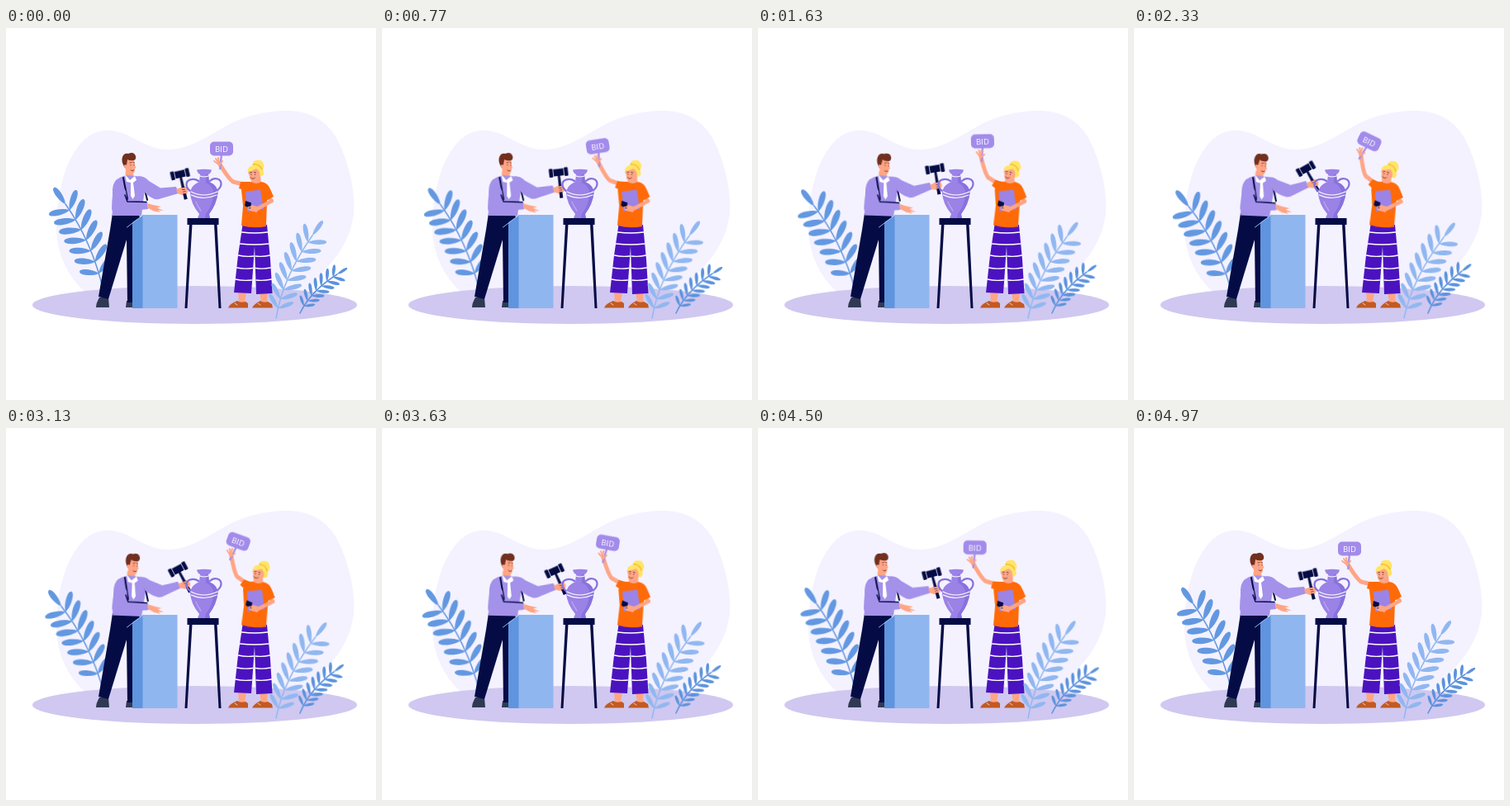
An HTML page for the animation above (5.01 s loop, 448 px wide and 450 px high).

```html
<!DOCTYPE html>
<html lang="en">
<head>
<meta charset="utf-8">
<title>Auction</title>
<style>
  html, body { margin: 0; width: 100%; height: 100%; overflow: hidden; background: #fff; }
  svg { display: block; width: 448px; height: 450px; }
  .sway, .gavel, .paddle {
    transform-origin: var(--o);
    animation: sway 5010ms cubic-bezier(.37, 0, .63, 1) infinite;
  }
  .gavel { animation-name: gavel; }
  .paddle { animation-name: paddle; }
  @keyframes sway {
    0%, 100% { transform: rotate(0deg); }
    51% { transform: rotate(var(--a)); }
  }
  @keyframes gavel {
    0%, 100% { transform: rotate(0deg); }
    27% { transform: rotate(14deg); }
    49% { transform: rotate(-7deg); }
    64% { transform: rotate(-6deg); }
  }
  @keyframes paddle {
    0%, 100% { transform: rotate(0deg); }
    27% { transform: rotate(-23deg); }
    49% { transform: rotate(2deg); }
    75% { transform: rotate(-5deg); }
  }
  .line { fill: none; stroke-linecap: round; stroke-linejoin: round; }
  .skin { fill: #ffa585; }
  .skin.line { fill: none; stroke: #ffa585; }
  .navy { fill: #050c45; }
  .navy.line { fill: none; stroke: #050c45; }
  .lilac { fill: #a491ea; }
  .orange { fill: #ff6a08; }
  .hair { fill: #ffe566; }
  .white.line { stroke: #fff; }
  .ink.line { stroke: #5b2a2a; stroke-width: .8; }
  text { font: 9.6px "Open Sans", "Noto Sans", sans-serif; fill: #fff; text-anchor: middle; }
</style>
</head>
<body>
<svg viewBox="0 0 448 450">
  <path fill="#f4f2ff" d="M94 318C70 295 60 265 61 236C62 195 73 160 90 140C108 120 128 121 148 130C165 138 178 148 200 147C235 144 255 120 290 108C310 102 325 100 342 100C375 101 395 118 406 145C417 172 423 200 421 225C417 255 402 276 385 294L360 325H100Z"/>
  <ellipse cx="228.500" cy="335" rx="196.500" ry="23" fill="#d0c8f0"/>

  <g id="fern" class="sway" style="--o:118px 318px; --a:-3.3deg"></g>

  <g id="man">
    <path fill="#2f3a52" d="M113 326H124L125 338H109Q109 333 113 326ZM146 330H156V338H145Z"/>
    <path class="navy" d="M129 224L161 223L164 245L157 332H147L146 256L124 328L112 325L126 244Z"/>
    <g class="sway" style="--o:141px 230px; --a:2.600deg">
      <path class="skin" d="M145 172L153 173L156 184L150 187L144 181Z"/>
      <g class="sway" style="--o:149px 179px; --a:6deg">
        <path class="skin" d="M143 160Q146 156 155 158L156 166L157.500 169L156 170Q156 177 152 177Q145 176 143 166Z"/>
        <path fill="#71301f" d="M144 169Q139 162 141 156Q143 151 148 152Q155 149 157 155Q158 159 155 160Q150 161 147 159L146 166Z"/>
        <circle class="skin" cx="144.600" cy="167" r="1.700"/>
        <path class="line ink" d="M150 163L152 162.500M154 162.500L155.500 163M151 165.500V166M155 165.500V166M151 172Q153 174 155 172"/>
      </g>
      <path class="lilac" d="M133 184Q138 180 146 178L157 179Q166 180 169 186L164 227H129Q127 204 133 184Z"/>
      <path fill="#fff" d="M144 177L150 184L156 179L158 184L154 187L156 203L153.500 207L151 203L151 187L146 186Z"/>
      <path class="line navy" stroke-width="2" d="M142 181L147 207M165 183L171 208"/>
      <g class="sway" style="--o:162px 187px; --a:-13deg">
        <path class="lilac" d="M160 179Q168 179 173 185L187 193.500L206 192L209 200L185 207Q177 209 165 196Z"/>
        <path class="skin" d="M206 195L212 193Q217 190 219.500 194L220.500 198Q218 202 213 202L207.500 200Z"/>
        <g class="gavel" style="--o:215px 197px">
          <g class="navy" transform="translate(1.500 .5) rotate(-13 214 197)">
            <path d="M212.600 178H215.400L216 207H212Z"/>
            <rect x="206.500" y="171.500" width="15" height="8.500"/>
            <rect x="202.500" y="170.500" width="4.500" height="10.500" rx="1"/>
            <rect x="221" y="170.500" width="4.500" height="10.500" rx="1"/>
            <path fill="#fff" d="M207 171.500H207.700V180H207ZM220.300 171.500H221V180H220.300Z"/>
          </g>
        </g>
        <path class="line skin" stroke-width="2.200" d="M212.500 194.500L218.500 193.500M213.500 197L219.500 196M213.500 199.500L218.500 199"/>
      </g>
      <path class="lilac" d="M135 183Q128 187 129 202L128 219Q130 224 137 223L172 219L171 211L147 211L145 197Z"/>
      <path class="line navy" stroke-width="1.500" d="M144 202L147 210L170 210.500"/>
      <path class="skin" d="M171 212L178 214L188 216L183 217.500L191 221L184 220.500L187 223L179 221.500L172 218Z"/>
    </g>
  </g>

  <g id="lectern">
    <path fill="#5f94de" d="M153 235L166 226V339H153Z"/>
    <path fill="#90b6ef" d="M165.500 226H207.500V339H165.500Z"/>
    <path class="line" stroke="#90b6ef" d="M146.500 241L166 226.500"/>
  </g>

  <g id="stool" class="navy">
    <path d="M219.500 230H257.500V238H219.500Z"/>
    <path d="M222 237H225.500L219.500 339H216.500ZM252 237H255.500L260.500 339H257.500Z"/>
  </g>

  <g id="vase">
    <path class="line" stroke="#8770dc" stroke-width="2.300" d="M233 185C227 181 218 183 218.500 190C219 196 225 198 226 200M247 185C252 180 261 182 260.500 189C260 195 254 197 253 200"/>
    <path fill="#9b82e6" d="M231 171.500Q240 170 249 171.500Q248 176 245 177L246 186Q257 191 256.500 200Q255 213 246 225L247 230H232L234 225Q224 213 223 200Q223 191 234 186L235 177Q232 176 231 171.500Z"/>
    <path fill="#8169db" d="M242 177H245L246 186Q257 191 256.500 200Q255 213 246 225L247 230H241L242 225Q251 213 251 200Q251 191 242 187Z" opacity=".7"/>
    <path class="line white" stroke-width="1.200" d="M235 179Q240 181 245 179M224 198Q239 206 256 198M224.500 202Q239 209 255 202"/>
    <path class="line" stroke="#b9a5ef" stroke-width="1.300" d="M230 210Q232 216 236 221"/>
  </g>

  <g id="woman">
    <path class="skin" d="M281 318H291L289 333H282ZM307 318H317L316 333H309Z"/>
    <path fill="#c25a22" d="M280 330Q284 333 290 331L293 333V338.500H269Q270 334 280 330ZM308 330Q312 333 317 331L322 334L323 338.500H298Q300 334 308 330Z"/>
    <path class="line" stroke="#fff" stroke-width=".7" d="M277 333L280 335M305 333L308 335"/>
    <path fill="#4b13bf" d="M286.500 238H316L320 280L322.500 321L303 322L301 264L297 321L276 320L281 275Z"/>
    <path class="line white" stroke-width="1.300" d="M285.500 247Q301 249 316.500 247M283.500 261Q301 263 318 261M281.500 275Q290 277 300 276M302 276Q311 277 319.500 275M279.500 290Q288 292 298.500 290.500M302.500 290.500Q311 292 320.500 290M278 304Q286 306 297.500 305M303 305Q311 306 321.500 304"/>
    <g class="sway" style="--o:303px 240px; --a:3deg">
      <g class="sway" style="--o:291px 190px; --a:22deg">
        <path class="line skin" stroke-width="5" d="M291 190L275 186Q270 183 259 165"/>
        <g class="paddle" style="--o:259px 164px">
          <path class="line" stroke="#a58fea" stroke-width="2.400" d="M261 152L259.300 170"/>
          <rect fill="#a28bea" x="247" y="137.500" width="28" height="17" rx="5"/>
          <text x="261" y="149.500">BID</text>
        </g>
        <path class="line skin" stroke-width="2" d="M259 166L252 161M258 164L254 158M258 163L257 157M259 165L262 161"/>
        <path class="orange" d="M296 186L284 186L282 194L293 198Z"/>
      </g>
      <path class="skin" d="M298 178L308 178L309 189Q302 193 297 188Z"/>
      <g class="sway" style="--o:303px 187px; --a:13deg">
        <path class="hair" d="M300 168Q297 161 303 160Q309 158 311 163Q314 167 311 171Q314 177 310 179Q306 180 303 176Z"/>
        <path class="skin" d="M295 170Q300 166 307 169L308 178Q306 185 300.500 186Q295 186 294.500 178L293 175Z"/>
        <path class="hair" d="M292.500 174Q292 168 299 166Q309 164 310.500 171Q311 176 307.500 179Q308 173 303 170Q298 173 292.500 174Z"/>
        <path class="line" stroke="#f8b62b" stroke-width="1.300" d="M299 165Q307 164 310 171"/>
        <path class="line ink" d="M295.500 175L297.500 174.500M300.500 174.500L302.500 175M297 177V177.500M301.500 177V177.500M296.500 181Q299 184 301.500 181"/>
      </g>
      <path class="orange" d="M288 187L297 186Q303 190 309 186Q317 187 320 195L323 203L316 208L315 240Q300 243 285 239L287 215L285 196Z"/>
      <path fill="#9c83e6" d="M290 198L308 195.500L312 219L292 222Z"/>
      <path class="line skin" stroke-width="4.500" d="M319 206L322 209L302 220"/>
      <path class="skin" d="M305 216L297 214L292 215L295 221L304 223Z"/>
      <path class="orange" d="M313 190Q319 191 324 204L315 209Z"/>
      <path class="navy" d="M290 209L297 211.500L296 219L289 215Z"/>
      <path class="line skin" stroke-width="1.500" d="M293 217L298 216M294 219.500L299 219"/>
    </g>
  </g>

  <g id="bush" class="sway" style="--o:327px 350px; --a:2.500deg"></g>
  <g id="sprig" class="sway" style="--o:356px 345px; --a:-5deg"></g>
</svg>
<script>
  // Grows leaf pairs along a quadratic stem; angles are degrees off the stem's direction.
  function grow(id, color, [a, b, c], { pairs, from, len, wide, left, right }) {
    const leaf = (x, y, angle, l) => {
      const w = wide * l / len;
      return `<path transform="translate(${x} ${y}) rotate(${angle})" d="M0 0C${l * .3} ${-w} ${l} ${-w} ${l} 0C${l} ${w} ${l * .3} ${w} 0 0Z"/>`;
    };
    const at = t => [0, 1].map(i => (1 - t) ** 2 * a[i] + 2 * t * (1 - t) * b[i] + t * t * c[i]);
    const heading = t => {
      const [dx, dy] = [0, 1].map(i => (1 - t) * (b[i] - a[i]) + t * (c[i] - b[i]));
      return Math.atan2(dy, dx) * 180 / Math.PI;
    };
    let out = `<path class="line" stroke="${color}" stroke-width="1.500" d="M${a}Q${b} ${c}"/>`;
    for (let i = 0; i < pairs; i++) {
      const t = from + (.92 - from) * i / (pairs - 1);
      const l = len * (.62 + .38 * Math.sin(Math.PI * (.12 + .6 * t)));
      const [x, y] = at(t);
      out += leaf(x, y, heading(t) - left, l) + leaf(x, y, heading(t) + right, l);
    }
    out += leaf(...c, heading(1), len * .9);
    const g = document.getElementById(id);
    g.setAttribute("fill", color);
    g.innerHTML = out;
  }

  grow("fern", "#6398e1", [[118, 318], [104, 258], [72, 213]],
    { pairs: 7, from: .18, len: 27, wide: 5.200, left: 68, right: 52 });
  grow("bush", "#90b7f0", [[327, 351], [335, 302], [371, 251]],
    { pairs: 8, from: .12, len: 24, wide: 4, left: 44, right: 56 });
  grow("sprig", "#5c92dd", [[356, 345], [369, 318], [401, 298]],
    { pairs: 7, from: .16, len: 16, wide: 2.700, left: 50, right: 50 });
</script>
</body>
</html>
```
